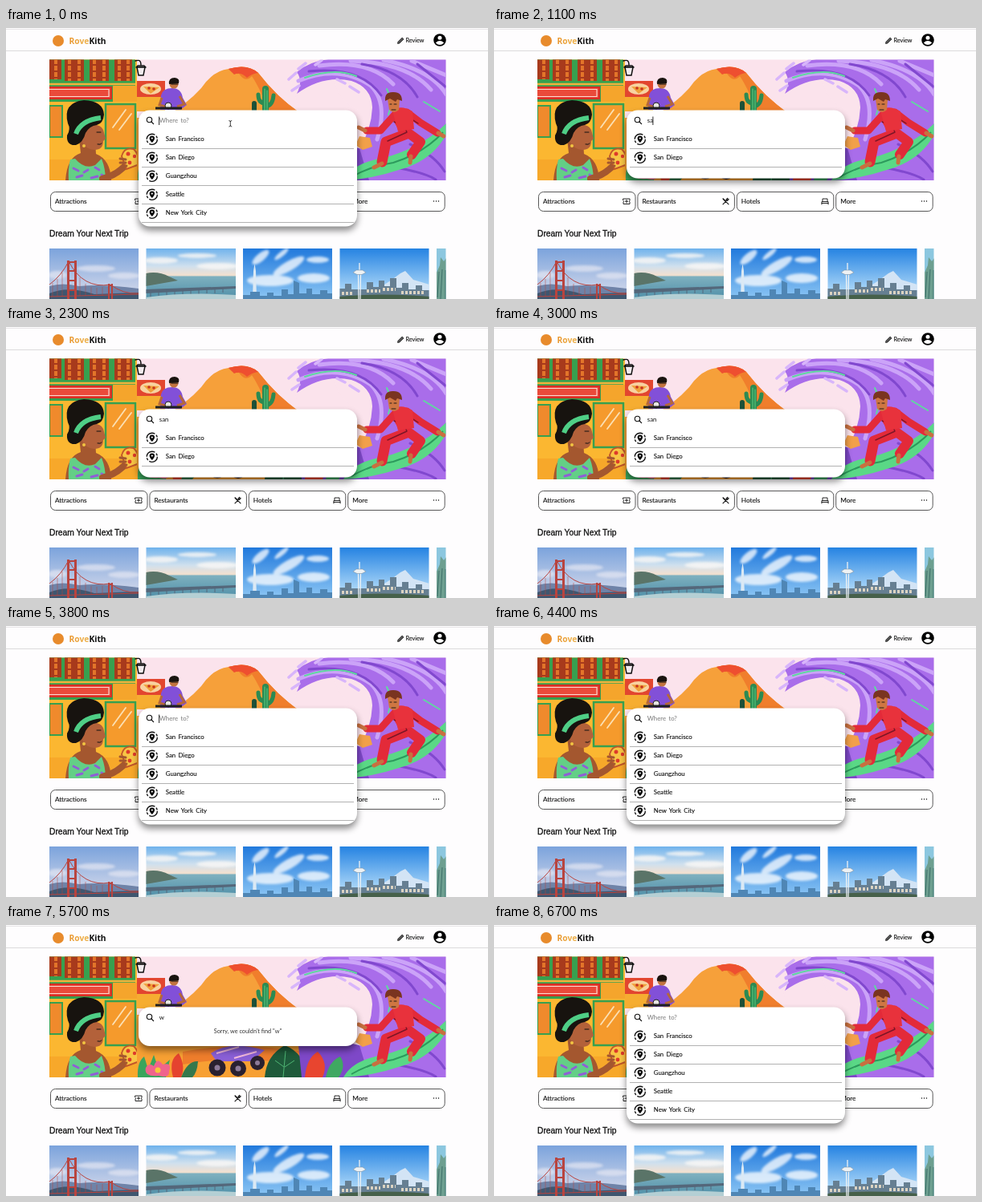
These frames come from a looping animation (600x338 px, 6.8 s). An HTML page:

```html
<!DOCTYPE html>
<html lang="en">
<head>
<meta charset="utf-8">
<title>Trip search</title>
<style>
  html, body { margin: 0; width: 100%; height: 100%; overflow: hidden; background: #fefdfe; }
  svg { display: block; width: 100vw; height: 100vh; }
  text { font: 8.2px Lato, "Open Sans", sans-serif; fill: #111; }
  .brand { font: 700 10.3px "Open Sans", "Noto Sans", sans-serif; }
  .title { font: 10.3px "Liberation Sans", sans-serif; stroke: #111; stroke-width: .3; }
  .small { font-size: 7.2px; }
  .row text, #query { font-size: 7.8px; word-spacing: 1.3px; }
  .row text, #buttons text, .small { stroke: #111; stroke-width: .12; }
  #sorry { font-size: 7.3px; text-anchor: middle; fill: #333; }
  #panel { fill: #fff; filter: drop-shadow(0 5px 4px #0007); }
  .line { fill: none; stroke: #111; stroke-linecap: round; stroke-linejoin: round; }
</style>
</head>
<body>
<svg viewBox="0 0 600 338" preserveAspectRatio="none">
  <defs>
    <clipPath id="heroClip"><path d="M54 39.5H547.5V190H54Z"/></clipPath>
    <clipPath id="photoClip"><path d="M54 275H165V338H54ZM174.5 275H286V338H174.5ZM295 275H406V338H295ZM415.5 275H526.5V338H415.5ZM536 275H547.5V338H536Z"/></clipPath>
    <linearGradient id="brandFill"><stop stop-color="#e9962e"/><stop offset=".45" stop-color="#edb14a"/><stop offset="1" stop-color="#e87f22"/></linearGradient>
    <linearGradient id="haze" x2="0" y2="1"><stop stop-color="#7ba3dc"/><stop offset=".75" stop-color="#c3cfe8"/></linearGradient>
    <linearGradient id="dusk" x2="0" y2="1"><stop stop-color="#6fb2ec"/><stop offset=".35" stop-color="#cfe0ee"/><stop offset=".53" stop-color="#f3e0cf"/><stop offset=".56" stop-color="#7eb0bf"/><stop offset="1" stop-color="#4f8fa8"/></linearGradient>
    <linearGradient id="day" x2="0" y2="1"><stop stop-color="#2179dc"/><stop offset="1" stop-color="#8cc6f4"/></linearGradient>
    <linearGradient id="clear" x2="0" y2="1"><stop stop-color="#2583e2"/><stop offset=".8" stop-color="#a5d3f7"/></linearGradient>
    <filter id="soft"><feGaussianBlur stdDeviation="1.8"/></filter>
  </defs>

  <path d="M0 1.5H600" stroke="#e6e4e6"/>
  <path d="M0 28.5H600" stroke="#dcdadc"/>
  <circle cx="65" cy="16" r="7" fill="#e88b2c"/>
  <text class="brand" x="78.5" y="19.8"><tspan fill="url(#brandFill)">Rove</tspan>Kith</text>
  <path d="M487.5 19.5l.5-2.3 5.2-5.2 1.9 1.9-5.2 5.2Z" fill="#555" stroke="#222" stroke-width=".8"/>
  <text class="small" x="497.5" y="18.3">Review</text>
  <circle cx="540" cy="15" r="7.8"/>
  <circle cx="540" cy="12.3" r="2.5" fill="#fff"/>
  <path d="M534.8 18.4Q540 13.8 545.2 18.4Q540 23.4 534.8 18.4Z" fill="#fff"/>

  <g clip-path="url(#heroClip)">
    <path d="M54 39H548V190H54Z" fill="#fbe3ec"/>
    <!-- shop front -->
    <path d="M54 39H163V190H54Z" fill="#fbb731"/>
    <path d="M54 39H161V92H54Z" fill="#37a04f"/>
    <path d="M54 39H69V64H54ZM73 39H97V66H73ZM104 39H128V66H104ZM135 39H157V66H135Z" fill="#a83a1c"/>
    <path d="M62 39V64M79 39V66M91 39V66M110 39V66M122 39V66M141 39V66M152 39V66" stroke="#e2742a" stroke-width="4" stroke-dasharray="6 2"/>
    <path d="M54 70H161" stroke="#f2b23c" stroke-width="2.5"/>
    <path d="M52 74H131V88H52Z" fill="#ea4a3a" stroke="#d92d25" stroke-width="2"/>
    <path d="M52 76.5H128V85.5H52Z" fill="none" stroke="#fbd9d2" stroke-width="1.2"/>
    <path d="M133 72H163V92H133Z" fill="#f5a52c"/>
    <path d="M54 97H70V136H54Z" fill="#f08a2c" stroke="#37a04f" stroke-width="2"/>
    <path d="M124 95H161V150H124Z" fill="#f59a2c" stroke="#37a04f" stroke-width="2.5"/>
    <path d="M133 124L149 102M141 127L156 107" stroke="#fbe0b4" stroke-width="1.8" stroke-linecap="round"/>
    <path d="M54 164H165V190H54Z" fill="#f7a82a"/>
    <!-- woman with pizza -->
    <path d="M91 138L93 156Q76 161 74 190H131Q130 164 112 157L111 141Z" fill="#a4572f"/>
    <path d="M80 164Q77 176 78 190H124Q124 176 119 163L111 171Q98 177 86 163Z" fill="#63cf86"/>
    <path d="M84 175l6 3M97 180l5-3M111 174l5 3M88 186l7-2M106 187l8-2M119 183l3 2" stroke="#8f5fd6" stroke-width="3" stroke-linecap="round"/>
    <path d="M120 188Q138 184 152 168" fill="none" stroke="#a4572f" stroke-width="8" stroke-linecap="round"/>
    <path d="M99 121Q117 118 121 127L124 138L121 141Q121 152 110 152Q97 151 93 138Z" fill="#b3613a"/>
    <path d="M97 90Q121 91 122 108Q121 119 113 121Q104 122 99 131Q96 143 87 146Q75 147 76 134Q81 126 77 119Q70 93 97 90Z" fill="#17130f"/>
    <path d="M87 132Q93 115 118 112" fill="none" stroke="#4fce86" stroke-width="6"/>
    <path d="M113 130h5M114 145q4 1 5-1" class="line" stroke-width="1"/>
    <circle cx="97" cy="147" r="2" fill="#f2c541"/>
    <path d="M144 160Q147 148 159 151Q166 158 166 170L150 176Z" fill="#f8c545" stroke="#c2572a" stroke-width="2"/>
    <g fill="#de3a2a"><circle cx="152" cy="157" r="2.5"/><circle cx="160" cy="160" r="2.2"/><circle cx="154" cy="168" r="2.4"/></g>
    <path d="M142 163l7 1M142 168l7 0M143 173l7-1" stroke="#a4572f" stroke-width="3" stroke-linecap="round"/>
    <!-- lamp and sign -->
    <path d="M161 41Q168 38 168 46M164 47H172L174 49H162Z" class="line" stroke-width="1.4"/>
    <path d="M163 49H173L171 59H165Z" fill="#f3ecef" stroke="#111" stroke-width="1.5"/>
    <path d="M163 66H198V86H163Z" fill="#e2462f"/>
    <path d="M163 86H198V104H163Z" fill="#f6ad31"/>
    <ellipse cx="180" cy="76" rx="13" ry="7" fill="#f8d2a0"/>
    <path d="M171 73L191 74L180 82Z" fill="#f0a13a"/>
    <circle cx="178" cy="75" r="1.8" fill="#c9321f"/><circle cx="184" cy="76" r="1.8" fill="#c9321f"/>
    <!-- desert -->
    <path d="M196 112Q225 95 243 75Q258 53 277 51Q301 44 314 56Q337 86 366 106V190H163V112Z" fill="#f6a03a"/>
    <path d="M277 51Q301 44 314 56Q337 86 366 106L330 112Q318 78 306 60Q298 69 290 57Q283 58 277 51Z" fill="#f07e2c"/>
    <path d="M277 51Q300 44 314 56Q306 57 300 62Q292 54 284 58Z" fill="#ee4f30"/>
    <path d="M163 150H365V190H163Z" fill="#f7a033"/>
    <path d="M220 158Q290 145 370 158V174Q280 162 220 174Z" fill="#ee7d2c"/>
    <!-- scooter rider -->
    <path d="M193 84Q195 75 207 75Q218 75 220 87L225 96L217 102H192Z" fill="#8250d8"/>
    <path d="M194 87L191 96L202 99M216 85L222 95L213 98" fill="none" stroke="#b5683a" stroke-width="3"/>
    <circle cx="209" cy="70" r="5.5" fill="#c2743f"/>
    <path d="M203 70Q202 62 210 62Q217 63 215 69Z" fill="#19140f"/>
    <path d="M206 70h8" class="line" stroke-width="1.2"/>
    <circle cx="202" cy="97" r="4" fill="#e8e5e2" stroke="#222"/>
    <path d="M186 100H219" stroke="#222" stroke-width="3"/>
    <!-- cacti -->
    <g fill="none" stroke="#2c8a52" stroke-linecap="round">
      <path d="M323 76V108" stroke-width="8"/>
      <path d="M314 83Q314 94 323 94M333 84Q332 97 323 98" stroke-width="5"/>
      <path d="M309 94V108" stroke="#1d5138" stroke-width="6"/>
      <path d="M322 76V106M325 78V106" stroke="#5ccf83" stroke-width="1"/>
    </g>
    <!-- buggy and plants -->
    <path d="M255 160Q278 144 322 156L306 170H262Z" fill="#8a5fd6"/>
    <path d="M262 160L290 152M284 166L312 158" stroke="#f2b9dc" stroke-width="2"/>
    <g fill="#29202f"><circle cx="263" cy="178" r="10.5"/><circle cx="289" cy="179" r="10"/><circle cx="313" cy="172" r="9"/></g>
    <g fill="#8c7a98"><circle cx="263" cy="178" r="3.5"/><circle cx="289" cy="179" r="3.5"/><circle cx="313" cy="172" r="3"/></g>
    <path d="M164 190Q163 171 172 164L177 180L184 162L190 180L204 168L199 190Z" fill="#3aa55c"/>
    <path d="M190 188Q171 190 174 178Q178 171 184 176Q188 164 195 174Q207 171 203 182Q204 192 190 188Z" fill="#f0648c"/>
    <circle cx="189" cy="181" r="3.5" fill="#f7c63c"/>
    <path d="M208 190Q202 168 215 160Q224 176 218 190Z" fill="#e5432f"/>
    <path d="M218 190Q226 169 239 170Q238 184 232 190Z" fill="#35784c"/>
    <path d="M322 190Q324 163 347 150Q372 160 376 190Z" fill="#1e5a3a"/>
    <path d="M345 190L348 157M346 177l-11-8M347 177l12-8" fill="none" stroke="#4fb674"/>
    <!-- wave -->
    <path d="M353 59Q386 34 431 45Q411 51 409 66Q414 92 440 103L420 190H372Q376 140 366 106Z" fill="#fbe3ec"/>
    <path d="M362 55Q385 35 427 39H548V190H376Q420 178 439 153Q455 126 456 99Q455 74 430 66Q395 58 362 82Q370 66 362 55Z" fill="#a96dea"/>
    <path d="M364 150Q400 140 440 150L452 190H368Z" fill="#7e48c8"/>
    <g fill="none" stroke-linecap="round">
      <path d="M364 66Q414 45 454 72Q476 93 462 139M390 47Q452 39 482 70M429 41Q500 43 529 77M470 40Q530 52 548 83M505 41L548 59" stroke="#cba3f8" stroke-width="5"/>
      <path d="M377 54Q442 47 467 84M443 45Q494 53 512 86M512 45L547 73M503 145Q533 158 546 179M485 174Q520 180 535 189" stroke="#8148cf" stroke-width="3"/>
      <path d="M372 62Q410 49 436 60M474 76Q482 92 476 108M520 92L540 104" stroke="#5fd9a0" stroke-width="2"/>
      <path d="M352 64l9-8M364 51l9-7M385 46l8-6M356 78l9-6M412 64l10 5M428 73l11 7" stroke="#d8b5fb" stroke-width="3.5"/>
    </g>
    <path d="M372 190Q374 166 388 158Q402 172 394 190Z" fill="#e8452f"/>
    <path d="M398 190Q402 170 416 164Q424 176 414 190Z" fill="#3fa862"/>
    <path d="M435 146L440 135L453 137L456 148L444 152Z" fill="#f2a04a"/>
    <!-- surfer -->
    <path d="M420 190Q432 168 470 162Q518 149 548 119V133Q530 166 489 177Q453 189 420 190Z" fill="#5ad886"/>
    <path d="M430 186Q454 172 482 168Q520 156 544 130" fill="none" stroke="#2c9a5c" stroke-width="2"/>
    <g fill="none" stroke="#e32a39" stroke-linecap="round" stroke-linejoin="round">
      <path d="M487 111L499 132L473 142L468 167" stroke-width="13"/>
      <path d="M501 131L516 142L505 158" stroke-width="12"/>
      <path d="M484 108L466 128L449 128" stroke-width="9"/>
      <path d="M499 105L516 118L537 131" stroke-width="9"/>
      <path d="M483 117Q497 122 499 130L475 141M491 105L513 119" stroke="#7d1526" stroke-width="1.4"/>
    </g>
    <path d="M481 103Q491 95 506 104L508 126L488 129Z" fill="#e8323c"/>
    <path d="M447 128l-8-4M538 131l7 4M468 169l-10 5M504 160l-1 8" stroke="#c8703f" stroke-width="5" stroke-linecap="round"/>
    <path d="M475 89Q482 82 490 90L489 102Q483 108 477 102Z" fill="#cf7642"/>
    <path d="M472 91Q471 80 481 80Q493 79 493 91L487 89L485 92L478 88Z" fill="#7a3420"/>
    <path d="M478 95h2M483 95h3M480 102h5" class="line" stroke-width=".9"/>
  </g>

  <g id="buttons"></g>
  <g class="line" stroke-width=".9">
    <path d="M161 213H169V215.2Q167.5 216 169 217V219.5H161V217Q162.5 216 161 215.2Z"/>
    <path d="M165 214.5V218M163.3 216.2H166.7"/>
    <path d="M285 212.8L292 219.8M285 219.8L290 214.8" stroke-width="1.1"/>
    <path d="M292 213.7L290.3 215.3M290.8 212.4L289 214.2M285.4 213.2L288 216" stroke-width="1.4"/>
    <path d="M408 220V216.5H416V220M408 218.5H416M409 216V213H415V216"/>
  </g>
  <g><circle cx="532.5" cy="216" r=".7"/><circle cx="535.5" cy="216" r=".7"/><circle cx="538.5" cy="216" r=".7"/></g>
  <text class="title" x="54" y="260.3">Dream Your Next Trip</text>

  <g clip-path="url(#photoClip)">
    <path d="M54 275H165V338H54Z" fill="url(#haze)"/>
    <g filter="url(#soft)" fill="#e4e6f2" opacity=".7"><ellipse cx="112" cy="300" rx="24" ry="4"/><ellipse cx="147" cy="309" rx="20" ry="4"/><ellipse cx="64" cy="308" rx="12" ry="5"/></g>
    <path d="M54 322Q70 317 91 322Q119 319 165 325V338H54Z" fill="#6f83a8"/>
    <path d="M54 331Q77 321 110 332L165 330V338H54Z" fill="#3f566f"/>
    <g fill="none" stroke="#b8443f">
      <path d="M77.5 338V290M86.5 338V290" stroke-width="3"/>
      <path d="M77 292H87M77 303H87M77 315H87M77 327H87M128 338V319M132 338V319M128 321H132" stroke-width="2"/>
      <path d="M54 320Q69 309 78 291Q96 326 130 320Q145 332 165 331M54 335L165 332"/>
      <path d="M58 318V335M64 313V335M70 305V335M92 311V334M99 319V334M106 323V334M113 324V334M120 323V334" stroke-width=".5"/>
    </g>
    <path d="M174 275H286V338H174Z" fill="url(#dusk)"/>
    <g filter="url(#soft)" fill="#fbf8f5" opacity=".8"><ellipse cx="192" cy="290" rx="22" ry="4"/><ellipse cx="238" cy="284" rx="24" ry="3"/><ellipse cx="263" cy="297" rx="26" ry="4"/></g>
    <path d="M174 306Q190 303 203 310L214 315L174 322Z" fill="#5a7468"/>
    <path d="M174 326L286 322V325L174 331Z" fill="#54677a"/>
    <path d="M180 328V337M190 328V336M200 327V335M210 327V334M220 326V333M230 326V333M240 325V332M250 325V331M260 324V331M270 324V330" stroke="#54677a"/>
    <path d="M174 336Q225 329 286 333V338H174Z" fill="#b4cfd4"/>
    <path d="M295 275H406V338H295Z" fill="url(#day)"/>
    <g filter="url(#soft)" fill="#fff" opacity=".75"><ellipse cx="317" cy="286" rx="13" ry="5" transform="rotate(-40 317 286)"/><ellipse cx="352" cy="297" rx="22" ry="6" transform="rotate(-30 352 297)"/><ellipse cx="343" cy="282" rx="11" ry="3" transform="rotate(-40 343 282)"/><ellipse cx="388" cy="289" rx="14" ry="4"/><ellipse cx="329" cy="315" rx="29" ry="7"/><ellipse cx="383" cy="312" rx="20" ry="6"/></g>
    <path d="M307 338L308 303L309.5 294L311 303L312 338Z" fill="#dbe9f4"/>
    <path d="M295 333H304V329H316V334H325V330H333V334H343V326H351V332H358V315L365 318V331H374V325H381V332H391V327H400V331H406V338H295Z" fill="#4f86b5"/>
    <path d="M415 275H527V338H415Z" fill="url(#clear)"/>
    <path d="M468 322Q481 314 491 306L497 303L507 314L527 320V338H468Z" fill="#d3e4f5"/>
    <path d="M415 325H422V319H430V326H449V317H457V323H464V315H471V322H478V312H486V324H493V318H501V326H510V321H518V327H527V338H415Z" fill="#667f92"/>
    <path d="M418 331H433M449 328H466M469 326H485M492 330H522" stroke="#dbd3c2" stroke-width="4" stroke-dasharray="3 2"/>
    <path d="M415 335Q463 330 527 335V338H415Z" fill="#46604a"/>
    <path d="M440 293V302M438.5 307L439 338M441.5 307L441 338" stroke="#eef2f4" stroke-width="1.3"/>
    <path d="M432 305L436 302H444L448 305L443 307.5H437Z" fill="#eef2f4" stroke="#7991a4" stroke-width=".6"/>
    <path d="M536 275H548V338H536Z" fill="#8cc7df"/>
    <path d="M536 305L540 296L541 286L545 291L548 287V338H536Z" fill="#6d9f90"/>
    <path d="M539 304L537 336M543 301L541 338M547 302V338" stroke="#3d6f68"/>
  </g>

  <rect id="panel" x="165" y="102.5" width="272" rx="14"/>
  <g class="line"><circle cx="178.5" cy="114.5" r="3.2" stroke-width="1.1"/><path d="M181 117L183.6 119.6" stroke-width="1.3"/></g>
  <text id="query" x="190.8" y="118.3"></text>
  <path id="caret" d="M0 110.5V121" stroke="#111" stroke-width=".9"/>
  <g id="rows"></g>
  <text id="sorry" x="301" y="135"></text>
  <path id="mouse" class="line" d="M277.8 115.5Q279.3 115.5 279.3 117Q279.3 115.5 280.8 115.5M279.3 117V121.5Q279.3 123 277.8 123M279.3 121.5Q279.3 123 280.8 123" stroke-width=".8"/>
</svg>
<script>
const $ = id => document.getElementById(id);
const LOOP = 6800, BLINK = 500;
const cities = ["San Francisco", "San Diego", "Guangzhou", "Seattle", "New York City"];
// Each entry: time of a key press and the text it leaves in the field.
const keys = [[0, ""], [900, "s"], [1100, "sa"], [1400, "san"], [3400, "sa"], [3500, "s"],
  [3600, ""], [4600, "w"], [4800, "ws"], [5200, "w"], [5900, ""]];

$("buttons").innerHTML = ["Attractions", "Restaurants", "Hotels", "More"].map((label, i) =>
  `<rect x="${55.5 + i * 123.4}" y="204.5" width="120.5" height="24" rx="6" fill="#fff" stroke="#444" stroke-width=".9"/>
   <text x="${61 + i * 123.4}" y="218.8">${label}</text>`).join("");

$("rows").innerHTML = cities.map(city =>
  `<g class="row"><circle cx="181.8" cy="138.8" r="6.6" fill="none" stroke="#111" stroke-width="1.4" stroke-dasharray="14 2 3 1.7"/>
   <path d="M181.8 143Q178.6 139.5 178.6 137.7A3.2 3.2 0 0 1 185 137.7Q185 139.5 181.8 143Z"/>
   <circle cx="181.8" cy="137.6" r="1.1" fill="#fff"/>
   <text x="198.8" y="141.3">${city}</text>
   <path d="M169 150.5H433" stroke="#aaa" stroke-width=".9"/></g>`).join("");
const rows = [...$("rows").children];

function show(el, on) { el.style.display = on ? "" : "none"; }

function draw(now) {
  const t = now % LOOP;
  const [since, typed] = keys.findLast(([at]) => at <= t);
  let count = 0;
  rows.forEach((row, i) => {
    const match = cities[i].toLowerCase().startsWith(typed);
    show(row, match);
    if (match) row.setAttribute("transform", `translate(0 ${23 * count++})`);
  });
  $("panel").setAttribute("height", count ? Math.min(145, 39 + 23 * count) : 48.5);
  $("query").textContent = typed || "Where to?";
  $("query").style.fill = typed ? "#111" : "#777";
  $("sorry").textContent = count ? "" : `Sorry, we couldn't find "${typed}"`;
  const width = typed ? $("query").getComputedTextLength() : 0;
  $("caret").setAttribute("transform", `translate(${190.6 + width} 0)`);
  show($("caret"), (t - since) % (2 * BLINK) < BLINK);
  show($("mouse"), t < keys[1][0]);
  requestAnimationFrame(() => draw(performance.now() - start));
}
const start = performance.now();
draw(0);
</script>
</body>
</html>
```
